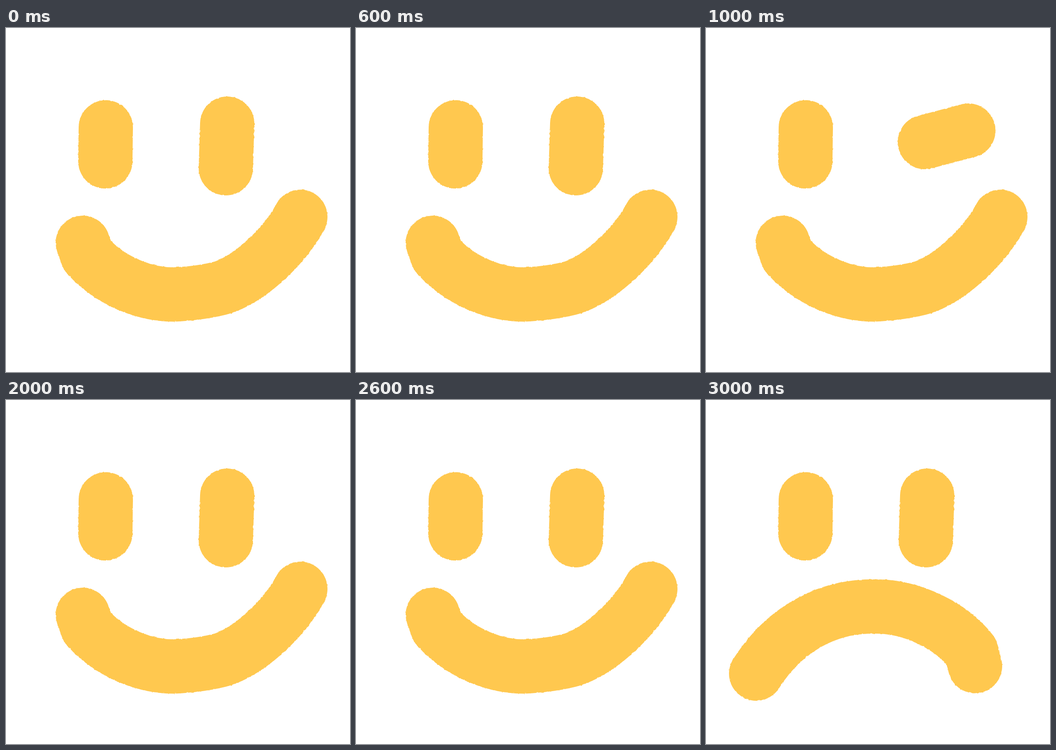
An HTML page for the animation above (4 s loop, 748x748 px).

```html
<!DOCTYPE html>
<html lang="en">
<head>
<meta charset="utf-8">
<title>Winking face</title>
<style>
  html, body { margin: 0; width: 100%; height: 100%; overflow: hidden; background: #fff; }
  svg { display: block; width: 100vw; height: 100vh; }
</style>
</head>
<body>
<svg viewBox="0 0 748 748">
  <filter id="rough" filterUnits="userSpaceOnUse" x="0" y="0" width="748" height="748" color-interpolation-filters="sRGB">
    <feTurbulence type="fractalNoise" baseFrequency="0.18" numOctaves="2" seed="4" result="noise"/>
    <feDisplacementMap in="SourceGraphic" in2="noise" scale="3" xChannelSelector="R" yChannelSelector="G"/>
  </filter>
  <g filter="url(#rough)" fill="none" stroke="#ffc84f" stroke-width="118" stroke-linecap="round" stroke-linejoin="round">
    <path d="M217 216L216 290"/>
    <path id="eye"/>
    <path id="mouth"/>
  </g>
</svg>
<script>
  const eye = document.getElementById('eye');
  const mouth = document.getElementById('mouth');

  const OPEN = 'M481 208L478 305';
  const WINK = 'M476 248L570.5 223';
  const SMILE = 'M167 467L177 495C227 550 300 579.5 365 579.5C398 578 440 573 472 564C536 541 606 473 640 410.5';
  const FROWN = 'M109 595C165 507 255 446 370 449C450 449 534 492 577 547L585 578.5';

  const POSES = [
    { eye: OPEN, mouth: SMILE },
    { eye: WINK, mouth: SMILE },
    { eye: OPEN, mouth: SMILE },
    { eye: OPEN, mouth: FROWN }
  ];
  const HOLD = 1000;

  let shown;
  let began;
  function draw(now) {
    began ??= now;
    const pose = POSES[Math.floor(Math.max(0, now - began) / HOLD) % POSES.length];
    if (pose !== shown) {
      shown = pose;
      eye.setAttribute('d', pose.eye);
      mouth.setAttribute('d', pose.mouth);
    }
    requestAnimationFrame(draw);
  }
  draw(performance.now());
</script>
</body>
</html>
```
